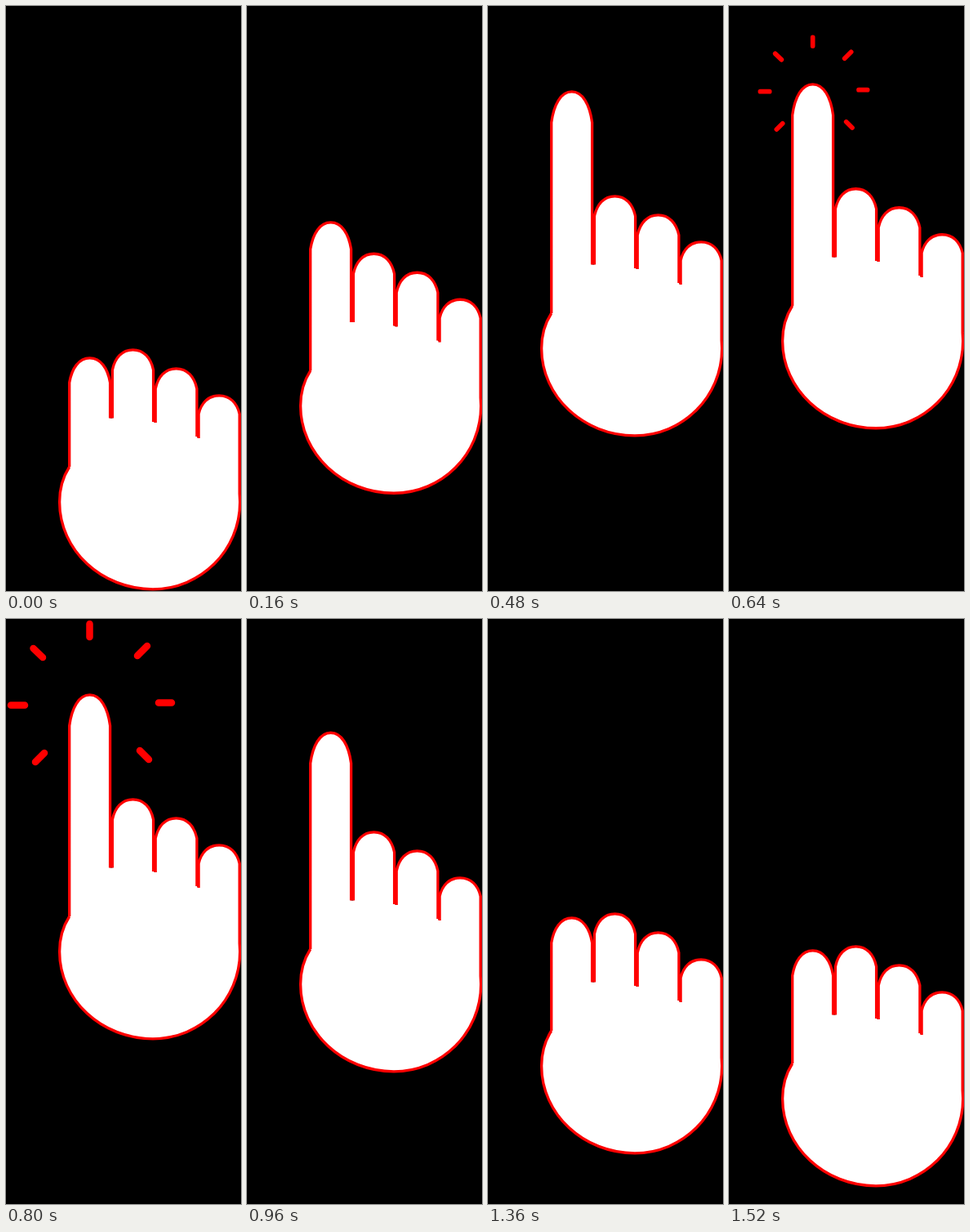
Recreate the animation shown at these times as an HTML page. Size 288 by 716 pixels, loop 1600 ms.

```html
<!DOCTYPE html>
<html lang="en">
<head>
<meta charset="utf-8">
<title>Tap gesture</title>
<style>
  html, body { margin: 0; width: 100%; height: 100%; overflow: hidden; background: #000; }
  svg { display: block; width: 288px; height: 716px; }
  path { fill: none; stroke: #f00; stroke-width: 3.3; }
  #skin { fill: #fff; stroke: none; }
  #sparks path { stroke-width: 8.5; stroke-linecap: round; }
</style>
</head>
<body>
<svg viewBox="0 0 288 716">
  <g id="sparks">
    <path d="M102.5 6V22M6 105.5H23M187 102.5H203M161 45L173 33M33.5 36L45 47M164 161L175 172M36 175L47 164"/>
  </g>
  <g id="hand">
    <path id="skin"/>
    <path id="outline"/>
  </g>
</svg>
<script>
const LOOP = 1600, STEP = 80;
const [sparks, hand, skin, outline] =
  ['sparks', 'hand', 'skin', 'outline'].map(id => document.getElementById(id));

const clamp = x => Math.min(1, Math.max(0, x));
const ramp = (t, from, to) => clamp((t - from) / (to - from));

// Fast ease-out on the way up, linear on the way down.
function lift(t) {
  if (t >= 800) return 200 * (1 - ramp(t, 800, LOOP));
  const p = t / 800;
  return 200 * (1 - Math.pow(1 - p, 4.42 - 2.25 * p));
}

// How far the index finger is stretched.
function stretch(t) {
  return t < 800 ? 138 * ramp(t, 0, 456) : 138 - 133 * ramp(t, 940, 1360);
}

// The tip is a slightly pointed arch on two straight sides.
function finger(x1, y1, x2, y2, top, height) {
  const side = top + height, mid = (x1 + x2) / 2, r = mid - x1;
  const lean = r * 0.12, flat = r * 0.54, bend = side - height * 0.58;
  return `${x1} ${y1}V${side}C${x1 + lean} ${bend} ${mid - flat} ${top} ${mid} ${top}` +
    `C${mid + flat} ${top} ${x2 - lean} ${bend} ${x2} ${side}V${y2}`;
}

// join "L" gives the closed fill, "M" leaves the finger bases open.
function handPath(ext, join) {
  return 'M' + [
    finger(77.7, 564, 127.6, 504.5, 430.9 - ext, 30 + ext * 0.055),
    finger(130.4, 504.5, 180.6, 509, 420.8, 24.5),
    finger(183.2, 510, 233.9, 527, 443.8, 24.5),
    finger(236.1, 529, 286.2, 597, 476.8, 22.5)
  ].join(join) +
  'L286.7 607C286.7 666 239 713.8 180 713.8C117 713.8 65.6 666 65.6 607C65.6 591 70 576 77.7 564';
}

function draw() {
  const t = Math.floor(performance.now() % LOOP / STEP) * STEP;
  const ext = stretch(t);
  hand.setAttribute('transform', `translate(0 ${-lift(t)})`);
  skin.setAttribute('d', handPath(ext, 'L'));
  outline.setAttribute('d', handPath(ext, 'M'));

  const scale = 0.5 + 0.5 * ramp(t, 560, 800);
  sparks.setAttribute('visibility', t >= 560 && t < 880 ? 'visible' : 'hidden');
  sparks.setAttribute('transform', `translate(103 103) scale(${scale}) translate(-103 -103)`);
  requestAnimationFrame(draw);
}
draw();
</script>
</body>
</html>
```
